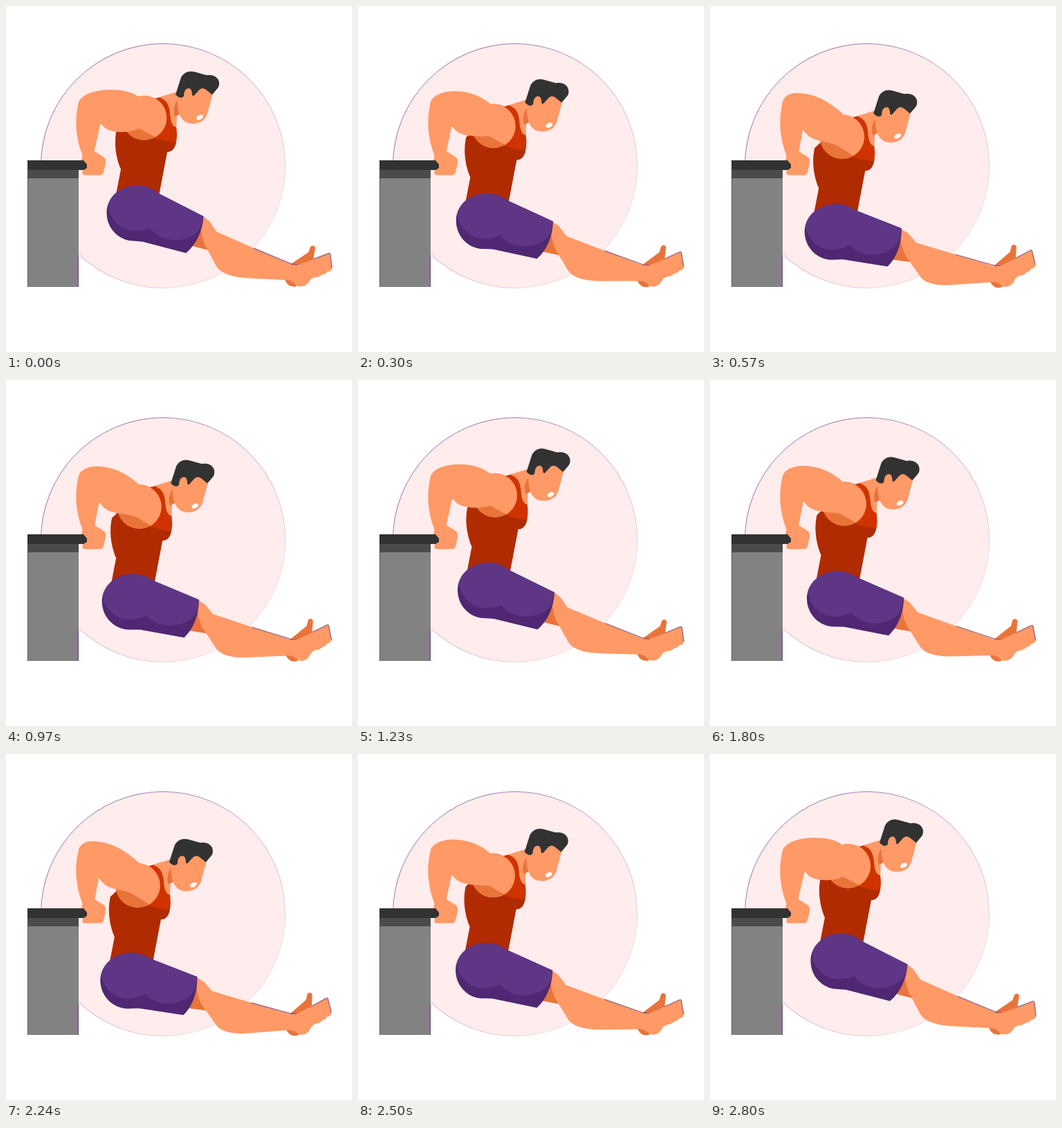
These frames come from a looping animation (500 px wide and 500 px high, 2830 ms). An HTML page:

```html
<!DOCTYPE html>
<html lang="en">
<head>
<meta charset="utf-8">
<title>Bench dips</title>
<style>
  html, body { margin: 0; width: 100%; height: 100%; overflow: hidden; background: #fff; }
  svg { display: block; width: 100vw; height: 100vh; }
  .skin { fill: #ff9966; }
  .shade { fill: #e9743a; }
  .dark { fill: #323232; }
</style>
</head>
<body>
<svg viewBox="0 0 500 500">
  <defs>
    <linearGradient id="rim" x1="0" y1="0" x2="1" y2="1">
      <stop offset=".2" stop-color="#8a67a6"/>
      <stop offset=".8" stop-color="#eed8e2"/>
    </linearGradient>
  </defs>

  <circle cx="227" cy="231" r="176.6" fill="#ffecec" stroke="url(#rim)" stroke-width=".9"/>

  <g id="leg">
    <path class="shade" d="M288 306L266 346L293 353Z"/>
    <path class="shade" d="M410 374L437 356L440 348Q444 344 447 349L444 367L425 385ZM403 395C406 403 411 407 420 405L418 394Z"/>
    <path class="skin" d="M285 304L294 311L304 326L358 350L413 374L422 374L442 367L465 358Q469 356 469 361L471 379Q470 384 464 384Q462 388 457 388Q453 392 447 392Q441 393 438 398C434 405 426 407 420 404C414 397 410 396 403 396L345 393C323 391 309 385 304 376L287 344C281 328 281 312 285 304Z"/>
    <path d="M358 350L413 373L421 374M444 366L466 357.5Q469 356 469 361L471 379" fill="none" stroke="#805078" stroke-width="1.4" opacity=".8"/>
  </g>

  <g id="torso">
    <path class="skin" d="M214 134L250 123L252 153L247 157L246 178L238 178Z"/>
    <path class="shade" d="M250 133C242 143 241 152 244 160L252 156Z"/>
    <path fill="#b02b00" d="M160 178C155 200 160 222 166 236L159 272L221 274L233 211C240 211 245 205 246 196L225 160L190 150Z"/>
    <path fill="#d03300" d="M214 134L222 132C232 136 236 143 237 155Q238 174 246 175Q248 185 246 197C232 196 222 193 213 190L192 177Z"/>
    <path class="skin" d="M248 130C246 158 255 170 270 170C282 170 290 163 292 152L299 126L280 108L255 110Z"/>
    <path class="dark" d="M245 128L253 103C257 96 264 93 272 95L290 100C301 98 309 105 308 113Q308 117 304 121L298 128C293 125 289 119 284 119C279 119 275 127 271 130L269 129C269 122 267 119 264 119C259 119 257 124 257 130Q253 136 245 128Z"/>
    <ellipse cx="280" cy="160.8" rx="5.2" ry="3.2" fill="#fff" transform="rotate(-25 280 160.8)"/>
    <circle class="shade" cx="199.5" cy="162" r="32"/>
  </g>

  <g id="shorts">
    <path fill="#4f2772" d="M221 271L285.5 304C284 325 275 345 260 357L197 340.5L185 339.5C163 339.5 145.500 321 145.500 299C145.500 276 165 259.5 190 259.5C202 259.5 212 264 221 271Z"/>
    <path fill="#5f3686" d="M221 271L285.5 304L282 318C277 330 265 336 250 338C233 340 217 333 208 320.5Q198 325 186 325C167 325 150 310 147.5 288C152 271 169 259.5 190 259.5C202 259.5 212 264 221 271Z"/>
  </g>

  <path id="arm" class="skin"/>
  <path class="skin" d="M111 214L128 210L141 218Q145 221 144 227L141 240Q140 244.5 135 244.5H114Q109 244 111 238L109 223Z"/>

  <g>
    <path fill="#828282" d="M31 249H105V406H31Z"/>
    <path d="M31.5 249V406M104.5 362V406" stroke="#71418a"/>
    <path fill="#4b4b4b" d="M31 237H105V249H31Z"/>
    <path class="dark" d="M31 223H112L117 229V234L112 237H31Z"/>
  </g>
</svg>
<script>
  const LOOP = 2830, FRAMES = 85, REPS = 2;
  const HIGH_ARM = "M105 139C108 130 124 121.5 150 121C168 121 182 124 191 131A32 32 0 0 1 216 189.5L192 177C180 184 148 185 140 173Q137 169 136 172L127 212L111 217C100 190 99 163 105 139Z";
  const LOW_ARM = "M105 138C107 130 116 126 124 126C153 126 176 142 193 158A32 32 0 0 1 207 217.5L187 205C172 194 150 199 138 184Q135 180 134 179L128 212L111 217C100 190 99 163 105 138Z";
  const part = id => document.getElementById(id);
  const [leg, torso, shorts, arm] = ["leg", "torso", "shorts", "arm"].map(part);

  // Blends two paths that share the same commands; arc flags must stay plain 0 or 1.
  function blend(from, to, amount) {
    const ends = to.match(/[\d.]+/g);
    let i = 0;
    return from.replace(/[\d.]+/g, n => +(+n + (ends[i++] - n) * amount).toFixed(2));
  }

  function draw(time) {
    const frame = Math.floor((time % LOOP + 4) * 30 / 1000) % FRAMES;
    const dip = (1 - Math.cos(2 * Math.PI * REPS * frame / FRAMES)) / 2;
    const shift = `translate(${-9.7 * dip} ${30 * dip})`;
    torso.setAttribute("transform", shift);
    shorts.setAttribute("transform", `${shift} rotate(${-6.3 * dip} 186 299)`);
    leg.setAttribute("transform", `rotate(${-7.8 * dip} 430 383)`);
    arm.setAttribute("d", blend(HIGH_ARM, LOW_ARM, dip / 0.94));
  }

  const start = performance.now();
  function tick() {
    draw(performance.now() - start);
    requestAnimationFrame(tick);
  }
  tick();
</script>
</body>
</html>
```
